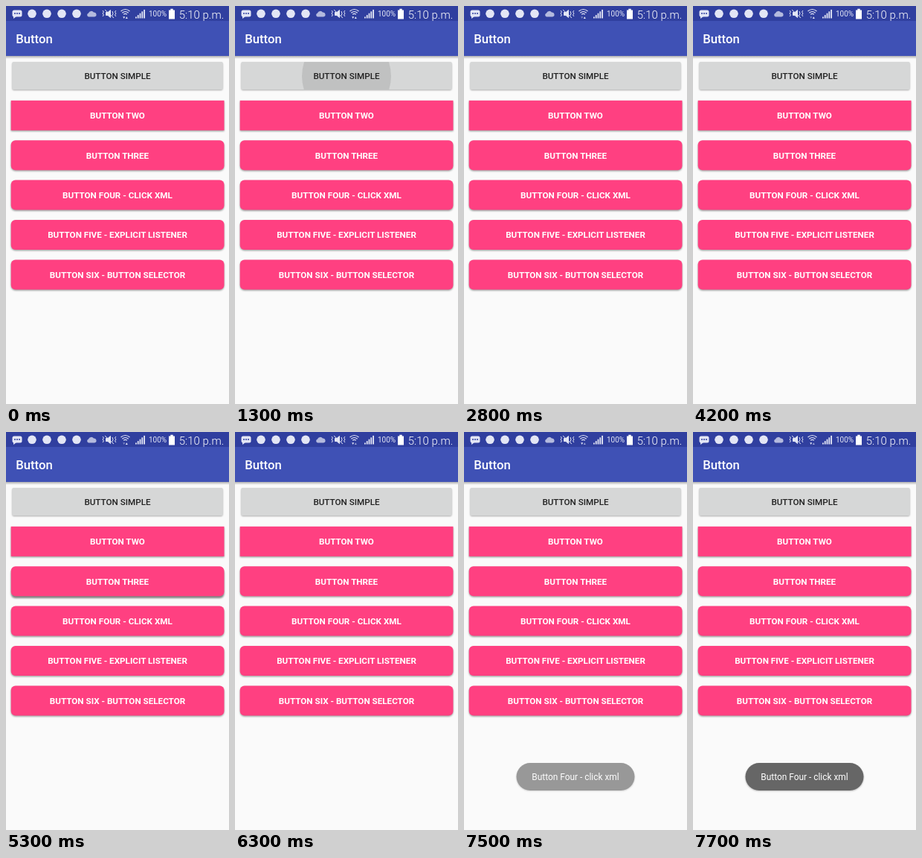
An HTML page that plays this animation: 300 by 534 pixels, repeating every 8 s.

```html
<!DOCTYPE html>
<html lang="en">
<head>
<meta charset="utf-8">
<title>Button</title>
<style>
html, body { margin: 0; width: 100%; height: 100%; overflow: hidden; background: #fafafa; }
svg { display: block; width: 100vw; height: 100vh; }
text { font-family: Roboto, sans-serif; }
.label { font-size: 11.67px; font-weight: 700; fill: #fff; text-anchor: middle; }
</style>
</head>
<body>
<svg viewBox="0 0 300 534">
  <defs>
    <filter id="soft" x="-10%" y="-40%" width="120%" height="180%"><feGaussianBlur stdDeviation="1.1"/></filter>
    <linearGradient id="barShade" x1="0" y1="0" x2="0" y2="1">
      <stop offset="0" stop-color="#000" stop-opacity=".3"/>
      <stop offset="1" stop-color="#000" stop-opacity="0"/>
    </linearGradient>
    <clipPath id="simpleClip"><rect x="8.3" y="75" width="283.4" height="37" rx="1.7"/></clipPath>
  </defs>
  <rect width="300" height="534" fill="#fafafa"/>
  <rect y="67" width="300" height="4" fill="url(#barShade)"/>
  <rect y="20" width="300" height="47" fill="#3f51b5"/>
  <rect width="300" height="20" fill="#303f9f"/>
  <text x="13.3" y="49.8" font-size="16.67" font-weight="500" fill="#fff">Button</text>

  <g fill="#e3e6f5">
    <rect x="8.5" y="5.5" width="13" height="9" rx="2.5"/>
    <path d="M10 13v4l4-3z"/>
    <g fill="#303f9f"><circle cx="12" cy="10" r="1"/><circle cx="15" cy="10" r="1"/><circle cx="18" cy="10" r="1"/></g>
    <g id="dots"></g>
    <path d="M111 14.5a2.6 2.6 0 0 1 0-5a4 4 0 0 1 7-1a3 3 0 0 1 1 6z" fill="#b4bade"/>
    <g id="mute" fill="none" stroke="#e3e6f5" stroke-width="1">
      <path d="M134.5 8.5h2.5l3.5-3v10l-3.5-3h-2.5z" fill="#e3e6f5"/>
      <path d="M133 5l12 11M130 6l1.5 2l-1.5 2l1.5 2l-1.5 2M148 6l-1.5 2l1.5 2l-1.5 2l1.5 2M143 7q2 3 0 6"/>
    </g>
    <g fill="none" stroke="#e3e6f5" stroke-width="1.2">
      <path d="M154.5 7q6-5 12 0M156.3 9.2q4.2-3.4 8.4 0M158.2 11.2q2.3-1.8 4.6 0"/>
    </g>
    <path id="down" d="M157.2 14.2h3l-1.5 2.8z"/>
    <path id="up" d="M160.8 17h3l-1.5-2.8z"/>
    <g id="signal"></g>
    <path d="M219 5.5h2.3v-1.7h3.4v1.7h2.3v12h-8z" fill="#fff"/>
    <text x="192" y="14.3" font-size="10">100%</text>
    <text x="293.3" y="16.5" font-size="15" font-weight="300" fill="#fff" text-anchor="end">5:10 p.m.</text>
  </g>

  <rect x="8.5" y="76" width="283" height="37" rx="2" opacity=".32" filter="url(#soft)"/>
  <rect x="8.3" y="75" width="283.4" height="37" rx="1.7" fill="#d6d7d7"/>
  <circle id="ripple" cx="150" cy="94" clip-path="url(#simpleClip)"/>
  <text class="label" x="150" y="98" style="font-weight:500;fill:#212121">BUTTON SIMPLE</text>
  <g id="buttons"></g>

  <g id="toast">
    <rect x="70.5" y="445.5" width="159" height="36" rx="18" opacity=".3" filter="url(#soft)"/>
    <rect x="70.5" y="444" width="159" height="37" rx="18.5" fill="#666"/>
    <text x="150" y="467" font-size="11.9" fill="#fff" text-anchor="middle">Button Four - click xml</text>
  </g>
</svg>
<script>
const LOOP = 8000, STEP = 100;
const $ = id => document.getElementById(id);
const clamp = v => Math.max(0, Math.min(1, v));
const ramp = (t, a, b) => clamp((t - a) / (b - a));

function add(parent, tag, attrs, text) {
  const el = document.createElementNS("http://www.w3.org/2000/svg", tag);
  for (const k in attrs) el.setAttribute(k, attrs[k]);
  if (text) el.textContent = text;
  return parent.appendChild(el);
}

for (let i = 0; i < 4; i++) add($("dots"), "circle", { cx: 35 + 20 * i, cy: 10.3, r: 5.8 });
for (let i = 0; i < 5; i++) {
  const h = 2 + 2.4 * i;
  add($("signal"), "rect", { x: 174 + 2.8 * i, y: 16.5 - h, width: 1.8, height: h });
}

// Each press is [start, full, release, end] in ms.
const buttons = [
  { text: "BUTTON TWO", press: [3000, 3150, 3150, 3300] },
  { text: "BUTTON THREE", press: [5100, 5300, 5500, 5600] },
  { text: "BUTTON FOUR - CLICK XML", press: [6800, 7000, 7000, 7200] },
  { text: "BUTTON FIVE - EXPLICIT LISTENER" },
  { text: "BUTTON SIX - BUTTON SELECTOR" }
];
buttons.forEach((b, i) => {
  const y = 126.8 + 53.4 * i, rx = i ? 6 : 0;
  const box = { x: 6.7, y, width: 286.8, height: 40, rx };
  b.shadow = add($("buttons"), "rect", { ...box, filter: "url(#soft)" });
  add($("buttons"), "rect", { ...box, fill: "#ff4081" });
  add($("buttons"), "text", { class: "label", x: 150, y: y + 24.3 }, b.text);
});

function lift(t, press) {
  if (!press) return 0;
  const [a, b, c, d] = press;
  return ramp(t, a, b) * (1 - ramp(t, c, d));
}

function draw(time) {
  const t = Math.floor((time % LOOP) / STEP) * STEP;
  buttons.forEach(b => {
    const z = lift(t, b.press);
    b.shadow.setAttribute("transform", `translate(0 ${1.3 + 1.5 * z})`);
    b.shadow.setAttribute("opacity", 0.38 + 0.1 * z);
  });

  const grow = ramp(t, 1100, 1600);
  $("ripple").setAttribute("r", 150 * grow);
  $("ripple").setAttribute("opacity", 0.1 * (grow > 0) * (1 - ramp(t, 1600, 2100)));

  const busy = t < 2800 || t >= 5900;
  $("down").setAttribute("opacity", busy ? 1 : 0.45);
  $("up").setAttribute("opacity", t < 5900 ? 1 : 0.6);

  $("toast").setAttribute("opacity", t < 7300 ? 0 : 0.32 + 0.68 * ramp(t, 7300, 7700));
}

const start = performance.now();
function tick() {
  draw(performance.now() - start);
  requestAnimationFrame(tick);
}
tick();
</script>
</body>
</html>
```
